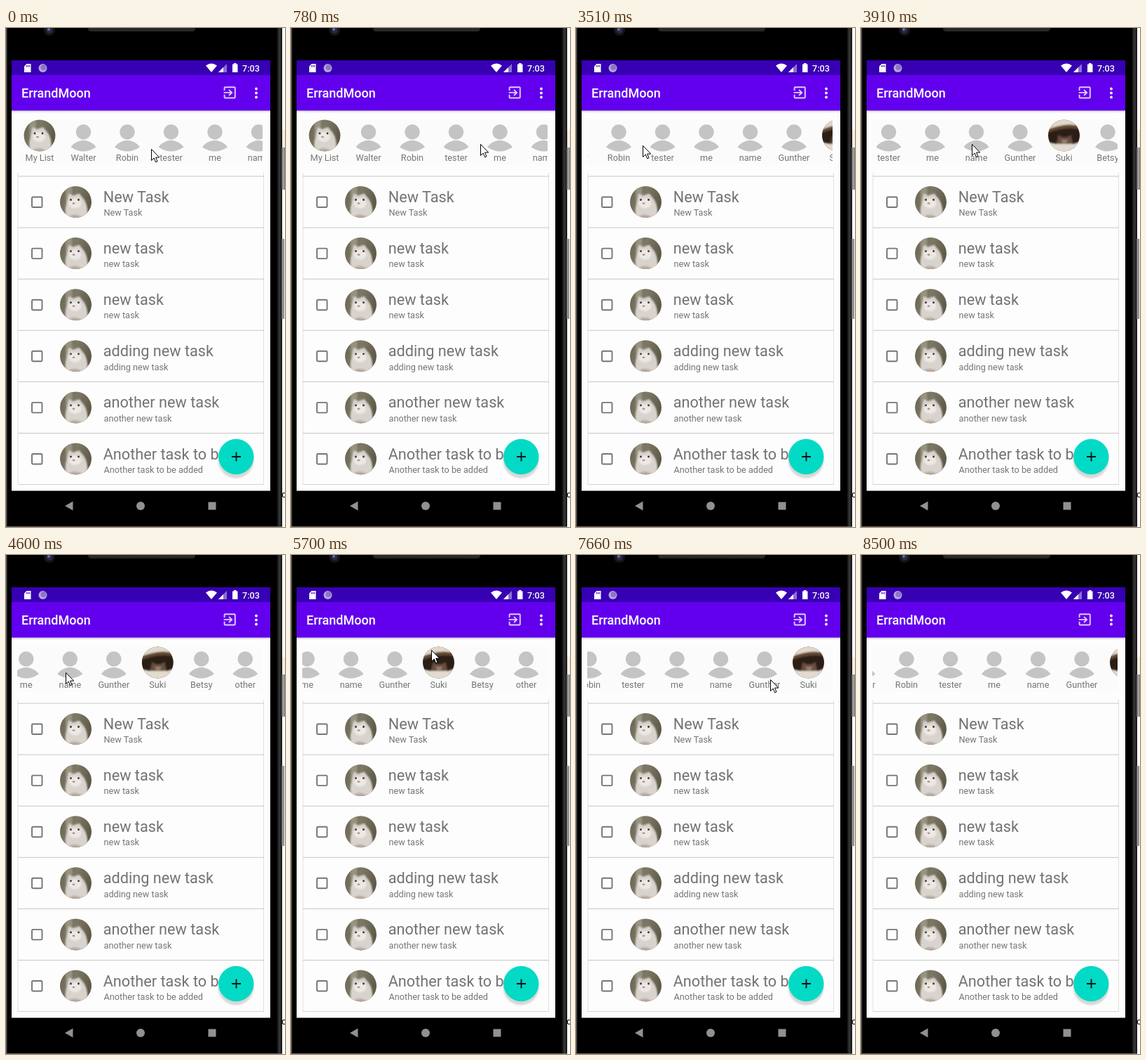
These frames come from a looping animation (398 by 710 pixels, 8.93 s). An HTML page:

```html
<!DOCTYPE html>
<html lang="en">
<head>
<meta charset="utf-8">
<title>Task list</title>
<style>
html, body { margin: 0; width: 100%; height: 100%; overflow: hidden; background: #fff; }
svg { display: block; width: 398px; height: 710px; font-family: Roboto, "Open Sans", sans-serif; }
.label, .note { font-size: 12.7px; fill: #757575; }
.label { text-anchor: middle; }
.task { font-size: 21.7px; fill: #737373; }
</style>
</head>
<body>
<svg viewBox="0 0 398 710" xmlns="http://www.w3.org/2000/svg">
  <defs>
    <clipPath id="disc"><circle r="22.5"/></clipPath>
    <clipPath id="strip"><rect x="16" y="128" width="350" height="70"/></clipPath>
    <linearGradient id="fade" x2="0" y2="1">
      <stop stop-color="#000" stop-opacity=".18"/><stop offset="1" stop-color="#000" stop-opacity="0"/>
    </linearGradient>
    <linearGradient id="edge">
      <stop/><stop offset=".5" stop-color="#3a3a3c"/><stop offset="1" stop-color="#111"/>
    </linearGradient>
    <linearGradient id="key">
      <stop stop-color="#444"/><stop offset=".5" stop-color="#aaa"/><stop offset="1" stop-color="#777"/>
    </linearGradient>
    <linearGradient id="wall" x2="1" y2=".4">
      <stop stop-color="#68624f"/><stop offset=".5" stop-color="#7d7865"/><stop offset="1" stop-color="#5f5948"/>
    </linearGradient>
    <filter id="soft" x="-20%" y="-20%" width="140%" height="140%"><feGaussianBlur stdDeviation="1"/></filter>

    <g id="hamster" clip-path="url(#disc)">
      <circle r="23" fill="url(#wall)"/>
      <g filter="url(#soft)">
        <path d="M-15-23H-5V-10L-14 2Z" fill="#97937f"/>
        <path d="M-13 23C-17 10-13 3-12-3L-10-12L-4-9L5-12L9-7C16 0 18 11 16 23Z" fill="#d8d3cd"/>
        <ellipse cx="-1" cy="2" rx="9" ry="7" fill="#ece9e5"/>
        <path d="M-12 23Q-3 13 11 23Z" fill="#b9aaa1"/>
      </g>
      <circle cx="-7" cy="-3" r="1.4" fill="#35302b"/><circle cx="4" cy="-3" r="1.4" fill="#35302b"/>
      <ellipse cx="-3" cy="2" rx="2" ry="1.3" fill="#b79288"/>
    </g>
    <g id="cat" clip-path="url(#disc)">
      <circle r="23" fill="#2b1e16"/>
      <g filter="url(#soft)">
        <path d="M-25-25H25V-13Q4-18-25-7Z" fill="#e0d8ca"/>
        <path d="M-25-8Q4-20 25-13V-8Q4-14-25-3Z" fill="#624630"/>
        <path d="M-11 12L-8-1L-3 2H5L10-1L13 12Z" fill="#66503f"/>
        <path d="M-4 6H6L3 11H-2Z" fill="#9a8069"/>
        <path d="M-25 9L-10 12H13L25 8V25H-25Z" fill="#e3dbcf"/>
      </g>
    </g>
    <g id="person" fill="#c4c4c4">
      <circle cy="-5" r="10.7"/>
      <path d="M-18 16.5C-13 9.5-6 7 0 7S13 9.5 18 16.5Q0 28.5-18 16.5Z"/>
    </g>
  </defs>

  <!-- phone body -->
  <rect width="394" height="710"/>
  <rect width="1.5" height="710" fill="#555"/>
  <rect x="386" width="8" height="710" fill="url(#edge)"/>
  <rect x="394" y="145" width="4" height="26" fill="#f6eedb"/>
  <rect x="393" y="170" width="5" height="60" fill="url(#key)"/>
  <rect x="393" y="300" width="4" height="114" fill="url(#key)"/>
  <text x="393" y="668" font-size="13">o</text>
  <rect x="117" y="-6" width="153" height="11" rx="4" fill="#222224"/>
  <path d="M120 1H268M121 3H268" stroke="#48484a" stroke-dasharray="1 2"/>
  <circle cx="62" cy="3" r="8" fill="#15151b"/><circle cx="62" cy="3" r="4.5" fill="#292c49"/><circle cx="61" cy="2" r="1.8" fill="#6d76a9"/>
  <rect y="709" width="394" height="1" fill="#666"/>

  <!-- screen and bars -->
  <rect x="8" y="46" width="369" height="612.5" fill="#fdfdfd"/>
  <rect x="8" y="117" width="369" height="4" fill="url(#fade)"/>
  <rect x="8" y="46" width="369" height="21" fill="#3700b3"/>
  <rect x="8" y="67" width="369" height="50.5" fill="#6200ee"/>
  <g fill="#fff">
    <path d="M29.5 51H35.5V63H26V54.5Z"/>
    <path d="M29.5 53v2.5M31.5 53v2.5M33.5 53v2.5" stroke="#3700b3"/>
    <circle cx="52.5" cy="57" r="6" fill="#b9a3e3"/><circle cx="53.5" cy="56" r="4" fill="#8e75c5"/>
    <path d="M285 53.5Q293 47.5 301 53.5L293 63Z"/>
    <path d="M303 63L315 51V63Z" fill="#8d70d1"/><path d="M303 63L310 56V63Z"/>
    <path d="M323 51.5H325V50H328.5V51.5H330.5V63H323Z"/>
    <text x="337" y="61.5" font-size="12.6" font-weight="500">7:03</text>
    <text x="22" y="99" font-size="18" font-weight="500">ErrandMoon</text>
    <path opacity=".8" transform="translate(307.8 80.5) scale(.95)" d="M10.09 15.59L11.5 17l5-5-5-5-1.41 1.41L12.67 11H3v2h9.67zM19 3H5c-1.1 0-2 .9-2 2v4h2V5h14v14H5v-4H3v4c0 1.1.9 2 2 2h14c1.1 0 2-.9 2-2V5c0-1.1-.9-2-2-2z"/>
    <path d="M357 86.5v12.1" stroke="#fff" stroke-width="3.8" stroke-linecap="round" stroke-dasharray="0 6"/>
  </g>
  <g fill="#919191">
    <path d="M84 680L95.5 673.5V686.5Z"/><circle cx="192" cy="680" r="6"/><rect x="288.5" y="674.5" width="11" height="11"/>
  </g>

  <rect x="16" y="130" width="350" height="64" fill="#fbfbfb"/>
  <g clip-path="url(#strip)"><g id="people"></g></g>

  <path d="M17 206V650M367.5 206V650" stroke="#e0e0e0"/>
  <g id="tasks"></g>

  <!-- add button -->
  <circle cx="328" cy="615" r="25.5" fill="#777" opacity=".28" filter="url(#soft)"/>
  <circle cx="328.3" cy="610" r="25.2" fill="#03dac5"/>
  <path d="M322 610H335M328.5 603.5V616.5" stroke="#111" stroke-width="1.8"/>

  <path id="cursor" d="M.5.5V16.5L4.2 13L6.7 18.8L9 17.8L6.6 12.1H11.7Z" fill="#fff" stroke="#000"/>
</svg>
<script>
const LOOP = 8930, STEP = 58, SCROLL_MAX = 275;
const byId = id => document.getElementById(id);
const strip = byId("people"), cursor = byId("cursor");

const people = ["My List", "Walter", "Robin", "tester", "me", "name", "Gunther", "Suki", "Betsy", "other"];
const faces = { "My List": "hamster", Suki: "cat" };
strip.innerHTML = people.map((name, i) => `
  <g transform="translate(${48 + 62.5 * i} 153)">
    <use href="#${faces[name] || "person"}"/><text class="label" y="36">${name}</text>
  </g>`).join("");

const tasks = ["New Task", "new task", "new task", "adding new task", "another new task", "Another task to be added"];
const titleOf = name => name.replace(" added", ""); // long titles are cut at the last whole word
byId("tasks").innerHTML = tasks.map((name, i) => `
  <g transform="translate(0 ${211 + 73.1 * i})">
    <path d="M17 0H368" stroke="#c6c6c6"/>
    <rect x="37" y="29.5" width="14.5" height="14.5" rx="1.5" fill="none" stroke="#757575" stroke-width="1.9"/>
    <use href="#hamster" x="99.5" y="36.5"/>
    <text class="task" x="138.7" y="37">${titleOf(name)}</text>
    <text class="note" x="139.5" y="56.3">${name}</text>
  </g>`).join("") + '<path d="M17 649.5H368" stroke="#d4d4d4"/>';

// A drag pulls the strip along with the pointer; glide is scrolling left over from a flick.
const hover = (start, end, x, y, glide = 0) => ({ start, end, x, y, glide, grip: 0 });
const drag = (start, end, x, y, glide = 0) => ({ start, end, x, y, glide, grip: 1 });

const moves = [
  hover(60, 590, 270, 165),
  hover(2200, 2790, 161, 162),
  drag(2970, 3210, 75, 167),
  hover(3450, 3910, 158, 165, 110),
  drag(3910, 4310, 127, 166),
  drag(4370, 5180, 41, 168),
  hover(5350, 5700, 200, 135),
  hover(5700, 6040, 331, 155),
  drag(6230, 6750, 380, 152),
  hover(7000, 7240, 205, 166),
  drag(7480, 7660, 277, 177),
  drag(7660, 7910, 302, 178, -21),
  hover(8090, 8500, 372, 712)
];

const easeOut = p => p * (2 - p);

function progress({ start, end }, t) {
  if (t >= end) return 1;
  const elapsed = Math.floor((t - start + 8) / STEP) * STEP;
  return easeOut(Math.min(1, elapsed / (end - start)));
}

function poseAt(t) {
  let x = 207, y = 172, offset = 0;
  for (const move of moves) {
    if (t < move.start) break;
    const p = progress(move, t);
    const dx = (move.x - x) * p;
    offset = Math.max(0, Math.min(SCROLL_MAX, offset - move.grip * dx + move.glide * p));
    x += dx;
    y += (move.y - y) * p;
  }
  return { x, y, offset };
}

function draw(time) {
  const { x, y, offset } = poseAt(time % LOOP);
  strip.setAttribute("transform", `translate(${-offset} 0)`);
  cursor.setAttribute("transform", `translate(${Math.round(x)} ${Math.round(y)})`);
}

let origin;
function tick(now) {
  origin ??= now;
  draw(now - origin);
  requestAnimationFrame(tick);
}
draw(0);
requestAnimationFrame(tick);
</script>
</body>
</html>
```
